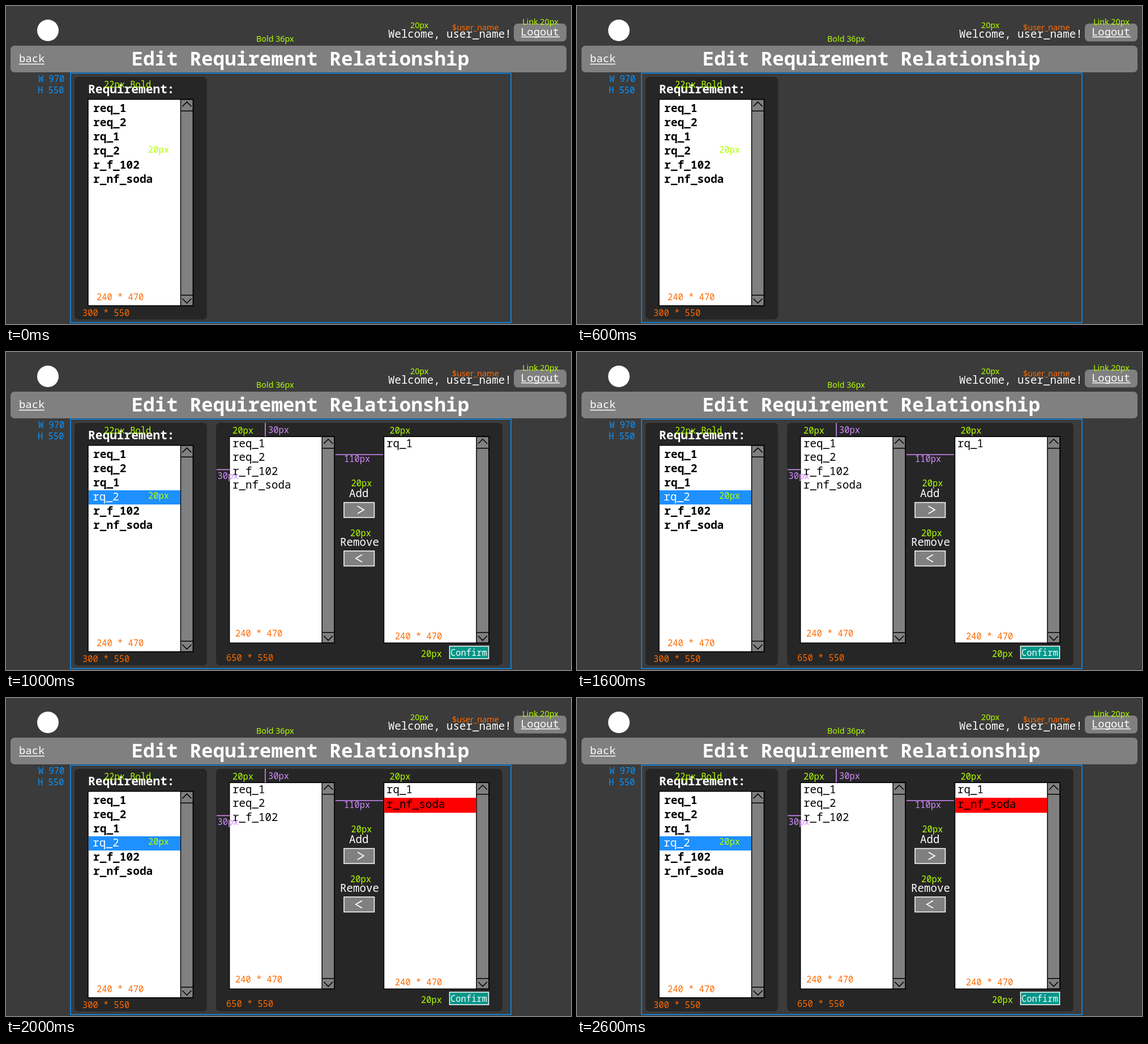
An HTML page with a canvas that plays this animation: 998x561 px, repeating every 3 s.

```html
<!DOCTYPE html>
<html lang="en">
<head>
<meta charset="utf-8">
<title>Edit Requirement Relationship</title>
<style>
html, body { margin: 0; width: 100%; height: 100%; overflow: hidden; background: #3b3b3b; }
canvas { display: block; }
</style>
</head>
<body>
<canvas id="stage" width="998" height="561"></canvas>
<script>
const ctx = document.getElementById('stage').getContext('2d');
const MONO = '"Noto Sans Mono", monospace';
const SANS = '"Noto Sans", sans-serif';
const WHITE = '#fff', BLACK = '#000', GRAY = '#808080', PANEL = '#262626';
const LIME = '#b2ff00', ORANGE = '#ff6a00', PURPLE = '#d38cff', BLUE = '#0a94ff';

// x is the left edge of the ink, y the baseline
function text(str, x, y, color, size = 15.4, weight = 400, family = MONO) {
  ctx.font = `${weight} ${size}px ${family}`;
  ctx.fillStyle = color;
  ctx.fillText(str, x + ctx.measureText(str).actualBoundingBoxLeft, y);
}

const label = (str, x, y, color) => text(str, x, y, color, 14.3, 400, SANS);

function rect(x, y, w, h, fill, stroke, width = 1.5) {
  if (fill) {
    ctx.fillStyle = fill;
    ctx.fillRect(x, y, w, h);
  }
  if (stroke) {
    ctx.strokeStyle = stroke;
    ctx.lineWidth = width;
    ctx.strokeRect(x, y, w, h);
  }
}

function rounded(x, y, w, h, fill) {
  ctx.fillStyle = fill;
  ctx.beginPath();
  ctx.roundRect(x, y, w, h, 7);
  ctx.fill();
}

function line(color, width, ...points) {
  ctx.strokeStyle = color;
  ctx.lineWidth = width;
  ctx.beginPath();
  points.forEach(([x, y]) => ctx.lineTo(x, y));
  ctx.stroke();
}

function listBox(x, y) {
  rect(x, y, 185.5, 364, WHITE);
  rect(x + 163.5, y, 22, 364, GRAY, BLACK);
  rect(x, y, 185.5, 364, null, BLACK);
  for (const dy of [20.5, 345.5]) line(BLACK, 1.5, [x + 163.5, y + dy], [x + 185.5, y + dy]);
  line(BLACK, 1.6, [x + 166.5, y + 12.5], [x + 174.5, y + 4.5], [x + 182.5, y + 12.5]);
  line(BLACK, 1.6, [x + 166.5, y + 351.5], [x + 174.5, y + 359.5], [x + 182.5, y + 351.5]);
}

function arrowButton(y, tipX, backX) {
  rect(597, y, 53.5, 26.5, GRAY, WHITE);
  line(WHITE, 1.8, [backX, y + 6.5], [tipX, y + 13], [backX, y + 19.5]);
}

function drawHeader() {
  ctx.fillStyle = WHITE;
  ctx.beginPath();
  ctx.arc(74, 43, 19, 0, Math.PI * 2);
  ctx.fill();
  rounded(8, 70, 982, 47, GRAY);
  rounded(897, 31, 93, 31.5, GRAY);
  text('Welcome, user_name!', 675, 56, WHITE, 19.1);
  text('Logout', 911, 52, WHITE, 18.9);
  line(WHITE, 1.3, [910, 54.5], [978, 54.5]);
  text('back', 24, 99, WHITE, 18.9);
  line(WHITE, 1.3, [23, 102.5], [68, 102.5]);
  text('Edit Requirement Relationship', 223.5, 105, WHITE, 34.3, 700);
  label('Bold 36px', 443, 62.5, LIME);
  label('20px', 714, 39, LIME);
  label('$user_name', 788, 43, ORANGE);
  label('Link 20px', 913, 33, LIME);
  text('W 970', 57, 134, BLUE);
  text('H 550', 57, 153.5, BLUE);
}

function drawRequirements(selected) {
  rounded(121, 125, 234, 428, PANEL);
  text('Requirement:', 146, 153.5, WHITE, 21.2, 700);
  text('22px Bold', 174, 143.5, LIME);
  listBox(145, 164.7);
  if (selected) rect(146, 244, 162, 25, '#1e90ff');
  ['req_1', 'req_2', 'rq_1', 'rq_2', 'r_f_102', 'r_nf_soda'].forEach((name, i) => {
    const active = selected && i === 3;
    text(name, 154, 187 + i * 24.9, active ? WHITE : BLACK, 19.5, active ? 400 : 600);
  });
  text('20px', 252, 259, LIME);
  text('240 * 470', 161, 519, ORANGE);
  text('300 * 550', 136, 547, ORANGE);
}

function drawRelations(moved) {
  const available = ['req_1', 'req_2', 'r_f_102'];
  const related = ['rq_1'];
  (moved ? related : available).push('r_nf_soda');

  rounded(371, 125, 506, 428, PANEL);
  listBox(394.7, 149.3);
  listBox(667.5, 149.3);
  if (moved) rect(668.2, 176, 162.3, 26.5, '#f00');
  available.forEach((name, i) => text(name, 401, 168 + i * 24.4, BLACK, 19.2));
  related.forEach((name, i) => text(name, 673, 168 + i * 25.5, BLACK, 19.2));

  text('Add', 606, 256, WHITE, 19.2);
  arrowButton(265.5, 632, 621);
  text('Remove', 591, 342, WHITE, 19.2);
  arrowButton(351, 618, 629);
  rect(783.5, 519, 69, 22, '#009688', WHITE);
  text('Confirm', 786, 536, WHITE, 15.4);

  line(PURPLE, 1.6, [458, 125], [458, 149]);
  line(PURPLE, 1.6, [372, 207.5], [395, 207.5]);
  line(PURPLE, 1.6, [582, 181], [666, 181]);
  text('30px', 464, 143, PURPLE);
  text('30px', 374.5, 224, PURPLE);
  text('110px', 598, 193.5, PURPLE);

  text('20px', 401, 143.5, LIME);
  text('20px', 678.5, 144, LIME);
  text('20px', 610.5, 237, LIME);
  text('20px', 609, 324.5, LIME);
  text('20px', 734, 538, LIME);
  text('240 * 470', 406, 501.5, ORANGE);
  text('240 * 470', 688, 507, ORANGE);
  text('650 * 550', 389, 545, ORANGE);
}

function render() {
  const step = Math.floor(performance.now() % 3000 / 1000);
  rect(0, 0, 998, 561, '#3b3b3b');
  drawHeader();
  drawRequirements(step > 0);
  if (step > 0) drawRelations(step === 2);
  rect(114, 118.5, 778, 440, null, BLUE);
  requestAnimationFrame(render);
}
render();
</script>
</body>
</html>
```
